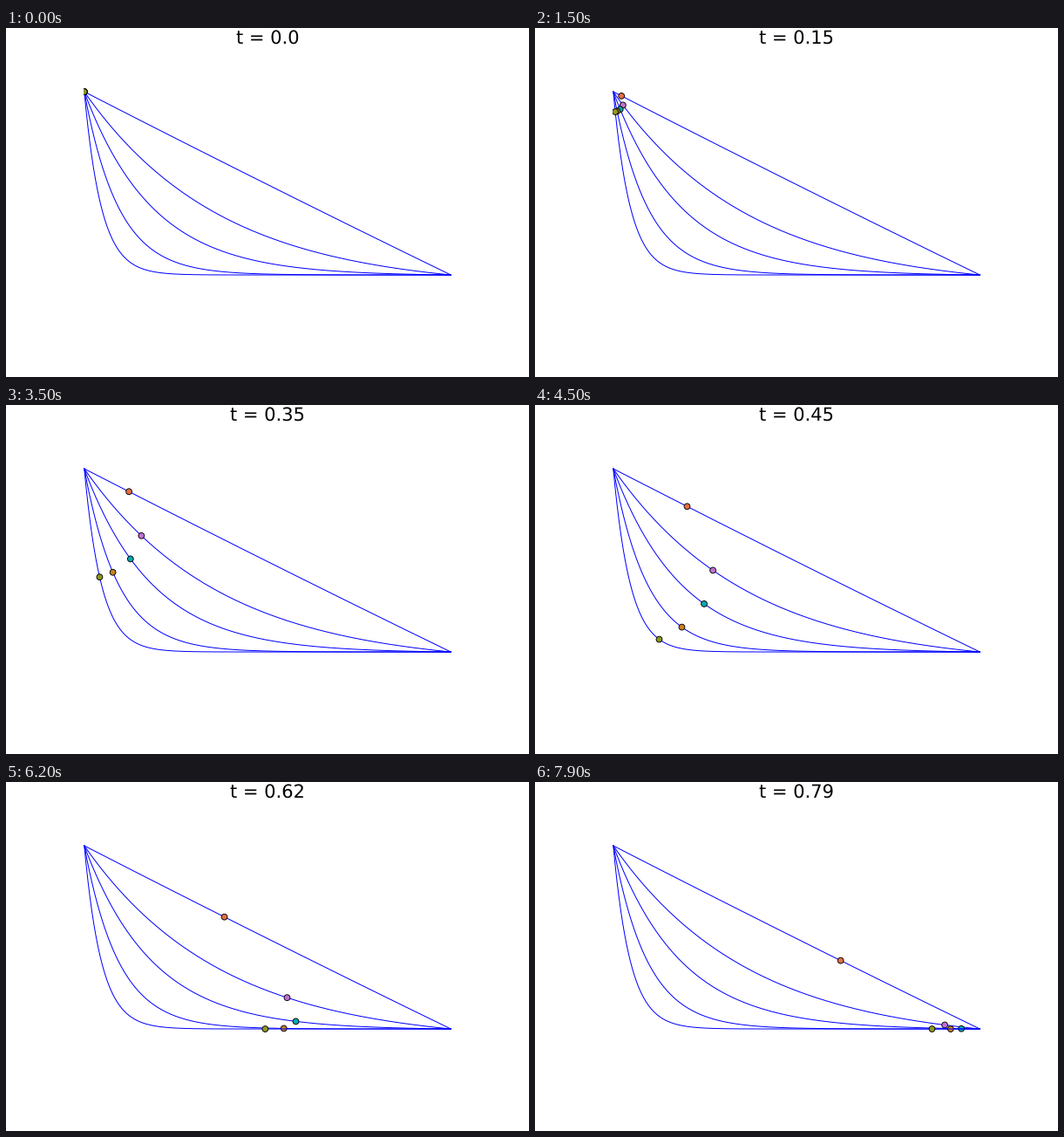
Write a matplotlib script that moves like this. It is 600x400 px and loops after 8 s.

```python
import numpy as np
import matplotlib.pyplot as plt
from matplotlib.animation import FuncAnimation
from matplotlib.patches import Circle, Rectangle

plt.rcParams["font.family"] = "DejaVu Sans"
plt.rcParams["text.hinting"] = "none"

W, H, DPI = 600, 400, 100
PT = 72 / DPI                      # points per pixel
FRAMES, STEP = 80, 100

LEFT, TOP = 89.8, 73.05            # shared start of all ramps
WIDTH, DROP = 420.6, 210.0
GRAVITY = 9.81 * DROP              # px / s^2

DECAYS = [0.055] + [2.67 * 2**n for n in range(4)]
COLORS = ["#e36f47", "#c371d2", "#00aaae", "#c68225", "#8e971e"]


def ramp(x, c):
    """Depth below the start at horizontal distance x."""
    return DROP * np.expm1(-c * x / WIDTH) / np.expm1(-c)


def slope(x, c):
    return DROP * c / WIDTH * np.exp(-c * x / WIDTH) / -np.expm1(-c)


def slide_times(c, n=4000):
    """Frictionless travel time to each x, from energy conservation."""
    u = np.linspace(0, 1, n + 1)
    mid = (u[1:] + u[:-1]) / 2
    x = WIDTH * mid**2
    speed = np.sqrt(2 * GRAVITY * ramp(x, c))
    dt = np.hypot(1, slope(x, c)) / speed * 2 * WIDTH * mid / n
    return np.concatenate([[0], np.cumsum(dt)]), WIDTH * u**2


fig = plt.figure(figsize=(W / DPI, H / DPI), dpi=DPI, facecolor="white")
ax = fig.add_axes([0, 0, 1, 1])
ax.set_xlim(0, W)
ax.set_ylim(H, 0)
ax.axis("off")

title = ax.text(W / 2, 18, "", size=21 * PT, ha="center", va="baseline")
window = Rectangle((89, 0), W - 89, H, transform=ax.transData)

xs = WIDTH * np.linspace(0, 1, 400) ** 2
beads = []
for i, (c, color) in enumerate(zip(DECAYS, COLORS)):
    ax.plot(LEFT + xs, TOP + ramp(xs, c), color="#0000ff", lw=PT, zorder=2 * i + 1)
    bead = Circle((LEFT, TOP), 3.4, facecolor=color, edgecolor="black",
                  lw=0.9 * PT, zorder=2 * i + 2)
    ax.add_patch(bead)
    bead.set_clip_path(window)
    beads.append((bead, c, *slide_times(c)))


def update(frame):
    t = frame / 100
    title.set_text(f"t = {t}")
    for bead, c, times, path in beads:
        x = np.interp(t, times, path)
        bead.center = (LEFT + x, TOP + ramp(x, c))
    return [title] + [b[0] for b in beads]


anim = FuncAnimation(fig, update, frames=FRAMES, interval=STEP, repeat=True,
                     repeat_delay=0, blit=False)
plt.show()
```
